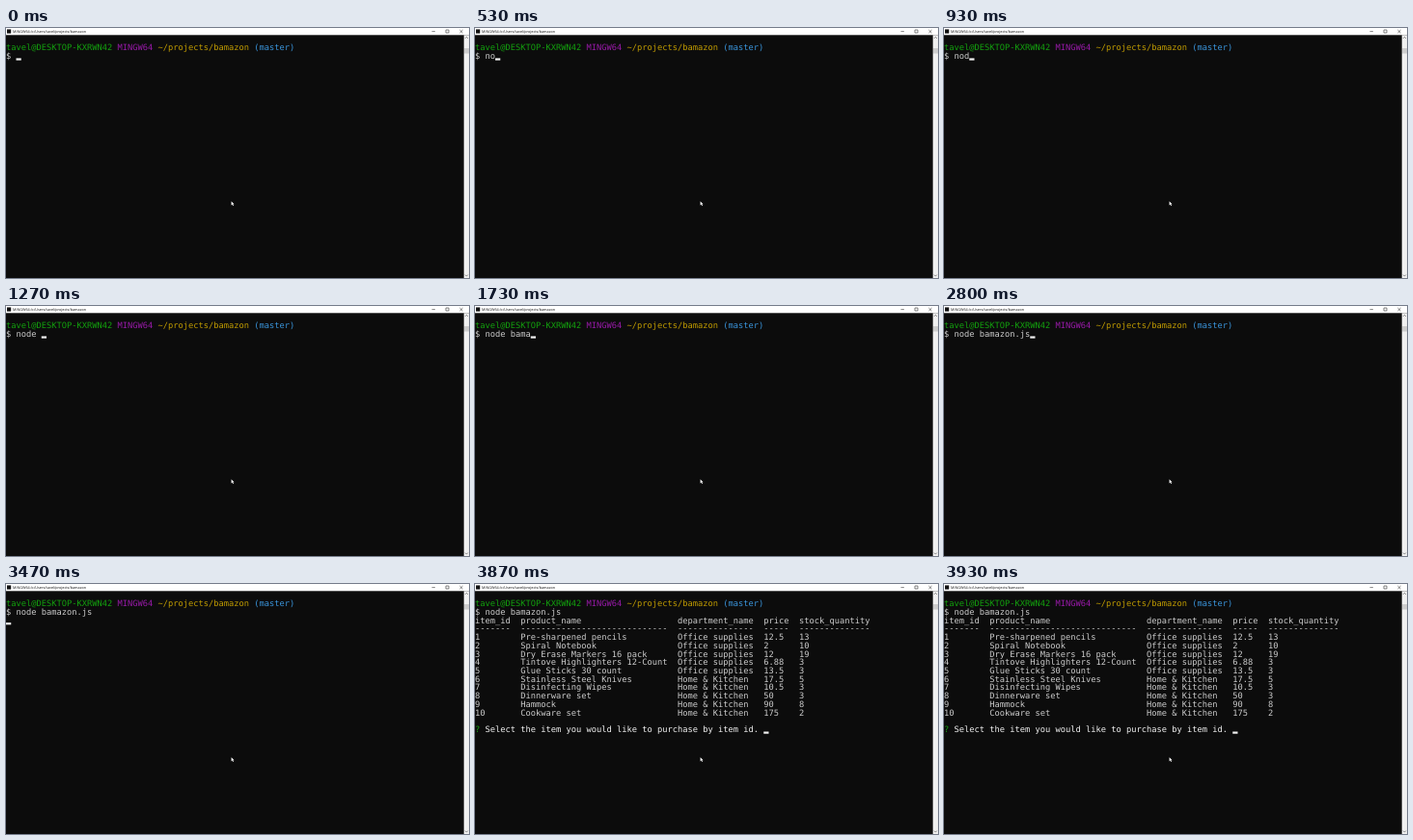
Animation of 480 by 260 pixels, one loop 5.54 s. Source, as an HTML page:

```html
<!DOCTYPE html>
<html lang="en">
<head>
<meta charset="utf-8">
<title>Terminal</title>
<style>
  html, body { margin: 0; width: 100%; height: 100%; overflow: hidden; background: #0c0c0c; }
  svg { display: block; width: 480px; height: 260px; }
  text { white-space: pre; text-rendering: geometricPrecision; }
  .term { font: 8.72px "DejaVu Sans Mono", monospace; fill: #ccc; }
  .title { font: 3.75px "Open Sans", sans-serif; fill: #111; }
  .green { fill: #13a10e; }
  .purple { fill: #981aa8; }
  .yellow { fill: #c19c00; }
  .cyan { fill: #3a96dd; }
  .bold { fill: #f2f2f2; }
</style>
</head>
<body>
<svg viewBox="0 0 480 260">
  <rect width="480" height="260" fill="#0c0c0c"/>

  <rect width="480" height="7.3" fill="#fff"/>
  <rect x="1" y="1.4" width="4.2" height="4.2" fill="#111"/>
  <text class="title" x="7" y="4.9">MINGW64:/c/Users/tavel/projects/bamazon</text>
  <path d="M441.5 3.6h3.4M456 2h3v3h-3zM470.4 2l3.2 3.2M473.6 2l-3.2 3.2" fill="none" stroke="#333" stroke-width=".6"/>

  <rect x="474.7" y="7.3" width="5.3" height="252.7" fill="#f0f0f0"/>
  <rect x="475" y="21" width="5" height="5.5" fill="#cdcdcd"/>
  <path d="M476 10.8l1.4-1.5 1.4 1.5M476 256.6l1.4 1.5 1.4-1.5" fill="none" stroke="#555" stroke-width=".7"/>

  <g id="screen" class="term"></g>
  <g id="results" class="term"></g>
  <rect id="cursor" width="5.25" height="2.2" fill="#f2f2f2"/>

  <path d="M233.6 180.2v4.2l1-.9.7 1.5.7-.3-.7-1.5h1.3z" fill="#fff"/>
</svg>
<script>
const LOOP = 5540, CELL = 5.25, LINE = 8.72, BASE = 23.2;
const $ = id => document.getElementById(id);

function put(group, col, row, str, cls = '') {
  const el = document.createElementNS('http://www.w3.org/2000/svg', 'text');
  el.setAttribute('x', col * CELL);
  el.setAttribute('y', BASE + row * LINE);
  el.setAttribute('class', cls);
  el.textContent = str;
  group.append(el);
  return el;
}

const screen = $('screen'), results = $('results'), cursor = $('cursor');

put(screen, 0, 0, 'tavel@DESKTOP-KXRWN42', 'green');
put(screen, 22, 0, 'MINGW64', 'purple');
put(screen, 30, 0, '~/projects/bamazon', 'yellow');
put(screen, 49, 0, '(master)', 'cyan');
put(screen, 0, 1, '$');
const typed = put(screen, 2, 1, '');

const columns = [0, 9, 40, 57, 64];
const office = 'Office supplies', home = 'Home & Kitchen';
const table = [
  ['item_id', 'product_name', 'department_name', 'price', 'stock_quantity'],
  [7, 29, 15, 5, 14].map(n => '-'.repeat(n)),
  ...[
    ['Pre-sharpened pencils', office, 12.5, 13],
    ['Spiral Notebook', office, 2, 10],
    ['Dry Erase Markers 16 pack', office, 12, 19],
    ['Tintove Highlighters 12-Count', office, 6.88, 3],
    ['Glue Sticks 30 count', office, 13.5, 3],
    ['Stainless Steel Knives', home, 17.5, 5],
    ['Disinfecting Wipes', home, 10.5, 3],
    ['Dinnerware set', home, 50, 3],
    ['Hammock', home, 90, 8],
    ['Cookware set', home, 175, 2]
  ].map((item, i) => [i + 1, ...item])
];
table.forEach((cells, r) => cells.forEach((cell, c) => put(results, columns[c], r + 2, cell)));
put(results, 0, 15, '?', 'green');
put(results, 2, 15, 'Select the item you would like to purchase by item id.', 'bold');

// [time in ms, characters typed]
const command = 'node bamazon.js';
const keys = [
  [0, 0], [270, 1], [530, 2], [930, 3], [1070, 4], [1270, 5], [1470, 6],
  [1730, 9], [2070, 10], [2330, 12], [2530, 13], [2800, 15]
];
const ENTER = 3070, OUTPUT = 3870;

function draw(t) {
  const count = keys.findLast(([at]) => at <= t)[1];
  const [col, row] = t >= OUTPUT ? [57, 15] : t >= ENTER ? [0, 2] : [2 + count, 1];
  typed.textContent = command.slice(0, count);
  results.style.display = t >= OUTPUT ? '' : 'none';
  cursor.setAttribute('x', col * CELL);
  cursor.setAttribute('y', BASE + row * LINE - 0.5);
}

const start = performance.now();
function tick() {
  draw((performance.now() - start) % LOOP);
  requestAnimationFrame(tick);
}
tick();
</script>
</body>
</html>
```
